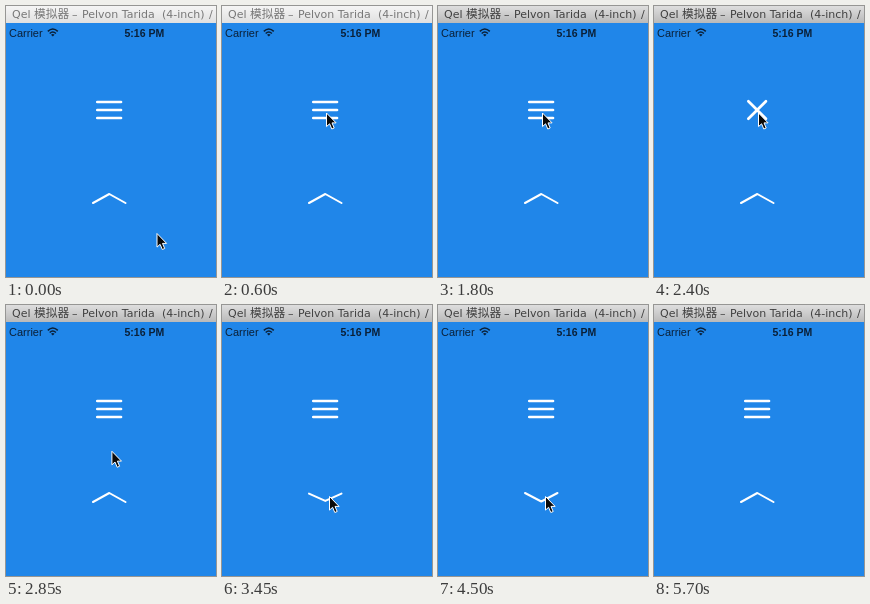
Write an HTML page that moves like this. It is 210x271 px and loops after 6000 ms.

```html
<!DOCTYPE html>
<html lang="zh">
<head>
<meta charset="utf-8">
<title>Menu button</title>
<style>
  html, body { margin: 0; width: 100%; height: 100%; overflow: hidden; background: #2086e9; }
  svg { display: block; width: 210px; height: 271px; }
  .title { font: 11px "DejaVu Sans", sans-serif; }
  .cjk { font: 11.7px "Noto Sans CJK SC", "Noto Sans CJK", sans-serif; }
  .status { font: 11px "Liberation Sans", Arial, sans-serif; fill: #0a2038; }
  .clock { font-size: 10.5px; font-weight: bold; }
  .stroke { fill: none; stroke: #fff; stroke-linecap: round; stroke-linejoin: round; }
</style>
</head>
<body>
<svg viewBox="0 0 210 271">
  <defs>
    <linearGradient id="idle" x2="0" y2="1">
      <stop stop-color="#f5f5f5"/><stop offset="1" stop-color="#e0e0e0"/>
    </linearGradient>
    <linearGradient id="active" x2="0" y2="1">
      <stop stop-color="#dedede"/><stop offset="1" stop-color="#b9b9b9"/>
    </linearGradient>
  </defs>
  <rect width="210" height="271" fill="#2086e9"/>
  <rect id="bar" width="210" height="17"/>
  <g id="label" class="title">
    <text x="6" y="12">Qel</text>
    <text class="cjk" x="28" y="12.3">模拟器</text>
    <text x="66" y="12">–</text>
    <text x="76" y="12">Pelvon Tarida</text>
    <text x="156" y="12">(4-inch)</text>
    <text x="203" y="12">/</text>
  </g>
  <text class="status" x="3" y="30.5">Carrier</text>
  <text class="status clock" x="118.5" y="30.5">5:16 PM</text>
  <g fill="none" stroke="#0a2038" stroke-width="1.5">
    <path d="M41.8 25.4Q46.8 20.6 51.8 25.4M43.7 27.5Q46.8 24.5 49.9 27.5"/>
    <path d="M46.8 30.6L45 28.8Q46.8 27.3 48.6 28.8Z" fill="#0a2038" stroke="none"/>
  </g>
  <path id="mid" class="stroke" stroke-width="2.7" d="M91.3 104H115"/>
  <path id="lines" class="stroke" stroke-width="2.7"/>
  <path id="caret" class="stroke" stroke-width="2"/>
  <path id="cursor" d="M0 0V13.6L3.1 10.8L5.3 16L7.7 15L5.5 9.9H9.6Z"
        fill="#0a0a0a" stroke="#fff" stroke-width="1"/>
</svg>
<script>
const LOOP = 6000, STEP = 150;
const $ = id => document.getElementById(id);
const set = (id, name, value) => $(id).setAttribute(name, value);
const mix = (a, b, p) => a + (b - a) * p;

function ease(t, start, length) {
  const x = Math.min(1, Math.max(0, (t - start) / length));
  return (1 - Math.cos(Math.PI * x)) / 2;
}

// Each toggle is [start, length]; they alternate between opening and closing.
const toggle = (t, list) =>
  list.reduce((p, [start, length], i) => p + (i % 2 ? -1 : 1) * ease(t, start, length), 0);

const crossTimes = [[720, 330], [1470, 330], [2070, 330], [2550, 300]];
const flipTimes = [[3300, 180], [3870, 330], [4200, 300], [4650, 300]];

function menuLine(p, side) {
  const cx = 103.15, cy = 104, r = 8.8;
  const x1 = mix(91.3, cx - r, p), x2 = mix(115, cx + r, p);
  const y1 = cy + side * mix(8, r, p), y2 = cy + side * mix(8, -r, p);
  return `M${x1} ${y1}L${x2} ${y2}`;
}

function cursorAt(t) {
  const a = ease(t, 0, 600), b = ease(t, 2640, 440);
  return [mix(mix(151, 104.5, a), 107.5, b), mix(mix(227.5, 107, a), 191.5, b)];
}

function draw(t) {
  const active = t >= 750;
  set("bar", "fill", active ? "url(#active)" : "url(#idle)");
  set("label", "fill", active ? "#404040" : "#777");

  const p = toggle(t, crossTimes);
  set("lines", "d", menuLine(p, -1) + menuLine(p, 1));
  set("mid", "opacity", 1 - p);

  const q = toggle(t, flipTimes);
  const end = mix(197, 188, q), tip = mix(188, 196.5, q);
  set("caret", "d", `M87 ${end}L103.3 ${tip}L119.5 ${end}`);

  set("cursor", "transform", `translate(${cursorAt(t)})`);
  set("cursor", "visibility", t < 5550 ? "visible" : "hidden");
}

const origin = performance.now();
function tick() {
  const t = (performance.now() - origin) % LOOP;
  draw(Math.floor(t / STEP) * STEP);
  requestAnimationFrame(tick);
}
tick();
</script>
</body>
</html>
```
